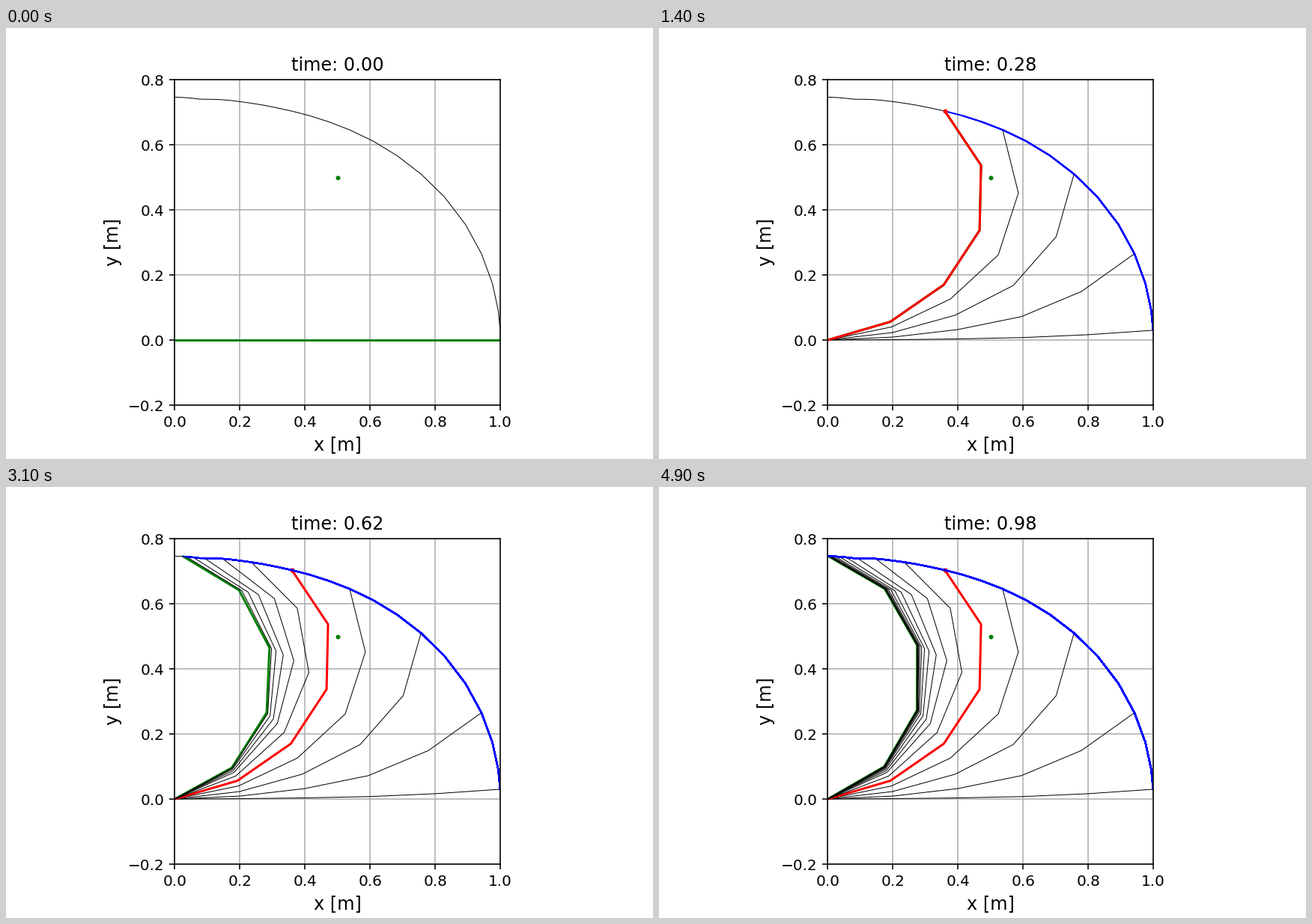
These frames come from a looping animation (864 by 576 pixels, 5000 ms). A matplotlib script:

```python
import numpy as np
import matplotlib.pyplot as plt
from matplotlib.animation import FuncAnimation

FRAMES, INTERVAL, DT = 50, 100, 0.02
LINK = 0.2
REST = 30.0 * np.arange(1, 6)      # final link headings in degrees
RED_POSE = 14
DECAY, TAIL_START = 0.856, 24

# Link headings in degrees at a few key steps
KEYS = {
    1: (0, 0, 0, 0, 0),
    2: (0.3, 0.7, 1.2, 2.5, 3.9),
    3: (0.8, 2.1, 3.7, 7.7, 12.0),
    5: (2.6, 6.6, 11.5, 22.7, 35.5),
    8: (6.6, 15.5, 27.1, 48.7, 74.1),
    11: (11.6, 25.4, 42.7, 72.0, 104.0),
    14: (16.3, 34.7, 56.7, 88.7, 123.7),
    17: (20.7, 42.0, 67.6, 100.3, 134.9),
    20: (24.3, 48.5, 75.3, 107.4, 142.4),
    TAIL_START: (26.4, 53.1, 82.7, 113.6, 146.7),
}


def settle(step):
    """Exponential approach to the rest pose."""
    gap = REST - np.array(KEYS[TAIL_START])
    return REST - gap * DECAY ** (step - TAIL_START)


steps = np.array(list(KEYS) + [TAIL_START + 4], float)
headings = np.array(list(KEYS.values()) + [settle(TAIL_START + 4)])
slopes = np.gradient(headings, steps, axis=0, edge_order=2)


def heading(step):
    if step <= 1:
        return headings[0]
    if step >= TAIL_START:
        return settle(step)
    i = np.searchsorted(steps, step, side="right") - 1
    h = steps[i + 1] - steps[i]
    u = (step - steps[i]) / h
    rise = u * u * (3 - 2 * u)
    return (headings[i] * (1 - rise) + headings[i + 1] * rise
            + h * u * (1 - u) * (slopes[i] * (1 - u) - slopes[i + 1] * u))


def pose(step):
    """Joint positions of the arm as an array of x, y rows."""
    a = np.radians(heading(step))
    links = LINK * np.column_stack([np.cos(a), np.sin(a)])
    return np.vstack([[0, 0], np.cumsum(links, axis=0)])


poses = [pose(n) for n in range(FRAMES)]
tips = np.array([p[-1] for p in poses])

fig = plt.figure(figsize=(6, 4), dpi=144, facecolor="white")
fig.subplots_adjust(left=0.125, right=0.9, bottom=0.125, top=0.88)
ax = fig.add_subplot(aspect="equal", xlim=(0, 1), ylim=(-0.2, 0.8))
ticks = np.arange(6) * 0.2
ax.set_xticks(ticks)
ax.set_yticks(ticks - 0.2)
ax.set_xlabel("x [m]", fontsize=12)
ax.set_ylabel("y [m]", fontsize=12)
ax.grid(True)
title = ax.set_title("time: 0.00", fontsize=12)

ax.plot(*tips.T, color="black", lw=0.5)
ax.plot(0.5, 0.5, "o", color="green", ms=2)
arm, = ax.plot(*poses[0].T, color="green", lw=1.5)

# Marks left behind by the motion, with the step at which each appears
marks = []
for n in range(2, FRAMES):
    marks += [(n, m) for m in ax.plot(*tips[2:n + 1].T, color="blue", lw=1)]
    if n == RED_POSE:
        marks += [(n, m) for m in ax.plot(*poses[n].T, color="red", lw=1.5)
                  + ax.plot(*tips[n], "o", color="red", ms=2)]
    elif n % 3 == 2:
        marks += [(n, m) for m in ax.plot(*poses[n].T, color="black", lw=0.5)]


def update(n):
    arm.set_data(*poses[n].T)
    title.set_text(f"time: {n * DT:.2f}")
    for start, mark in marks:
        mark.set_visible(start <= n)
    return [arm, title]


anim = FuncAnimation(fig, update, frames=FRAMES, interval=INTERVAL, repeat=True)
plt.show()
```
